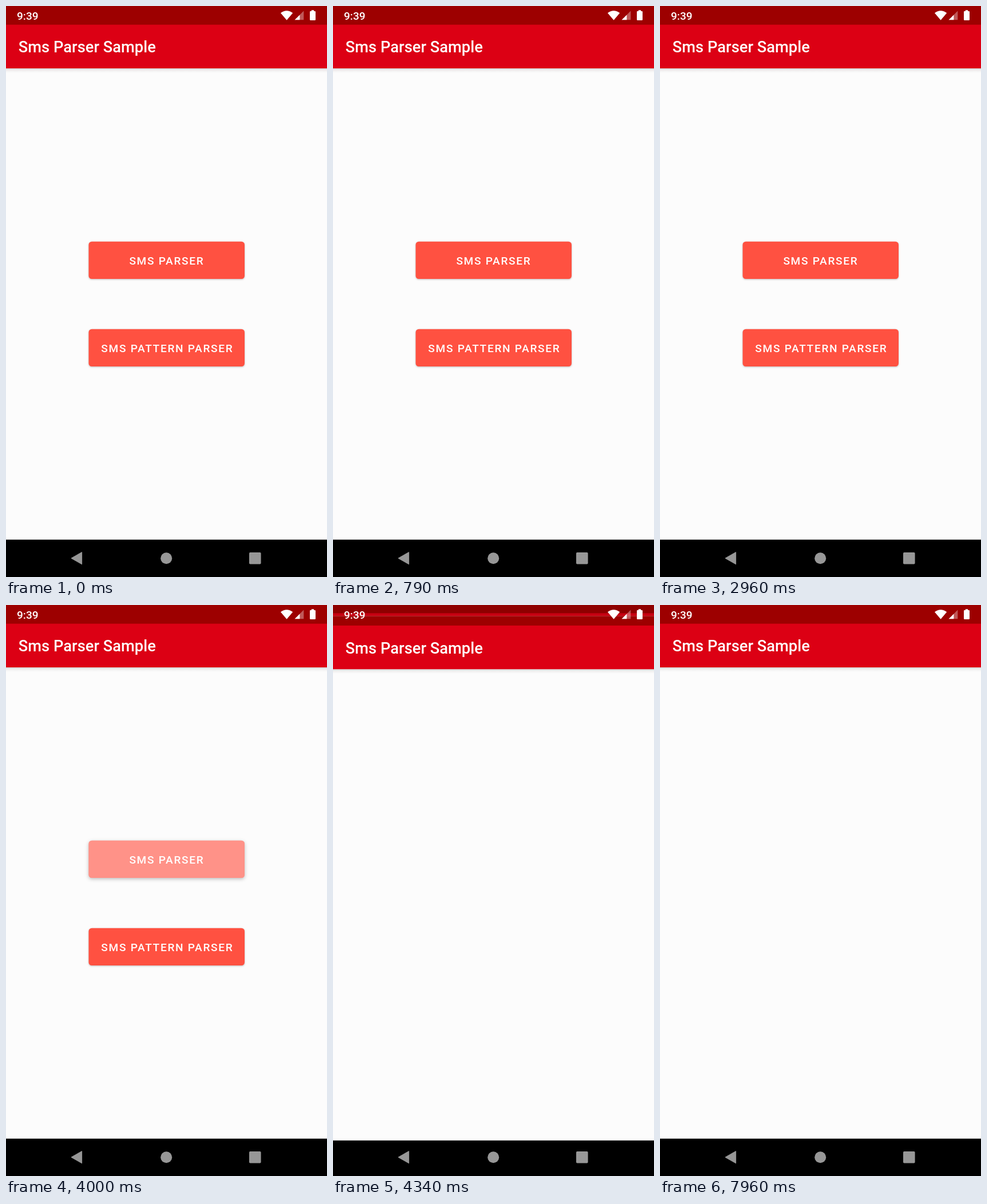
Write an HTML page that moves like this. It is 561x998 px and loops after 8 s.

```html
<!DOCTYPE html>
<html lang="en">
<head>
<meta charset="utf-8">
<style>
  html, body { margin: 0; width: 100%; height: 100%; overflow: hidden; background: #000; }
  svg { display: block; width: 561px; height: 998px; }
  text { font-family: Roboto, sans-serif; font-weight: 500; fill: #fff; }
  .title { font-size: 27.3px; }
  .label { font-size: 19.1px; letter-spacing: 1.7px; }
  .clock { font-size: 19.1px; }
  .face { fill: #ff5141; }
</style>
</head>
<body>
<svg viewBox="0 0 561 998">
  <defs>
    <linearGradient id="shade" x2="0" y2="1">
      <stop offset="0" stop-opacity=".16"/>
      <stop offset=".4" stop-opacity=".05"/>
      <stop offset="1" stop-opacity="0"/>
    </linearGradient>
    <clipPath id="buttonClip"><rect x="144.5" y="411.7" width="272.5" height="65.3" rx="5.5"/></clipPath>
    <clipPath id="revealClip"><rect id="reveal" width="561" height="998"/></clipPath>
    <g id="window">
      <rect width="561" height="998" fill="#fcfcfc"/>
      <rect y="109" width="561" height="8" fill="url(#shade)"/>
      <rect width="561" height="34" fill="#9d0000"/>
      <rect y="32.7" width="561" height="76.3" fill="#dc0014"/>
      <rect y="932.7" width="561" height="66" fill="#000"/>
      <text class="title" x="21.8" y="81.4">Sms Parser Sample</text>
    </g>
  </defs>

  <rect width="561" height="998"/>

  <g id="menu">
    <use href="#window"/>
    <rect id="button" class="face" x="144.5" y="411.7" width="272.5" height="65.3" rx="5.5"/>
    <g clip-path="url(#buttonClip)" fill="#fff">
      <rect id="tint" x="144" y="411" width="274" height="67"/>
      <circle id="ripple" cx="280.5" cy="444.5" fill-opacity=".215"/>
    </g>
    <text class="label" x="215.4" y="451.6">SMS PARSER</text>
    <rect class="face" x="144.5" y="564.7" width="272.5" height="65.3" rx="5.5"
      style="filter: drop-shadow(0 1.5px 1.5px rgba(0,0,0,.25))"/>
    <text class="label" x="166.3" y="604.6">SMS PATTERN PARSER</text>
  </g>

  <g id="parser">
    <g clip-path="url(#revealClip)"><use href="#window"/></g>
  </g>

  <g id="system" fill="#fff">
    <text class="clock" x="19" y="24">9:39</text>
    <path d="M480 12.2Q490.5 4.4 501.2 12.2L490.6 24.8Z"/>
    <path d="M520.3 8.6V24.3H504.6Z" fill-opacity=".35"/>
    <path d="M513.4 15.5V24.3H504.6Z"/>
    <path d="M533.8 7.2h4.4v1.8h1.6q1.2 0 1.2 1.2v13.5q0 1.2-1.2 1.2h-7.6q-1.2 0-1.2-1.2v-13.5q0-1.2 1.2-1.2h1.6z"/>
    <g fill="#979797">
      <path d="M114 965.2L132.6 954.6V975.8Z" stroke="#979797" stroke-linejoin="round"/>
      <circle cx="280.2" cy="965.2" r="10"/>
      <rect x="425" y="955" width="20.6" height="20.6" rx="1.8"/>
    </g>
  </g>
</svg>
<script>
  const LOOP = 8000;
  const PRESS = { start: 3340, grow: 260, tint: 80, lift: 100 };
  const OPEN = { start: 4057, span: 425 };
  const HEIGHT = 998;

  const $ = id => document.getElementById(id);
  const clamp = v => Math.min(1, Math.max(0, v));
  const bezier = (s, a, b, c, d) => {
    const r = 1 - s;
    return a * r * r * r + 3 * b * s * r * r + 3 * c * s * s * r + d * s * s * s;
  };

  // Finds y at x on a cubic given as four x values and four y values.
  function ease(x, xs, ys) {
    let lo = 0, hi = 1;
    for (let i = 0; i < 24; i++) {
      const mid = (lo + hi) / 2;
      if (bezier(mid, ...xs) < x) lo = mid; else hi = mid;
    }
    return bezier((lo + hi) / 2, ...ys);
  }

  const slowIn = p => ease(p, [0, 0.4, 0.2, 1], [0, 0, 1, 1]);
  const extraSlowIn = p => p < 1 / 6
    ? ease(p, [0, 0.05, 0.1333, 0.1667], [0, 0, 0.06, 0.4])
    : ease(p, [0.1667, 0.2083, 0.25, 1], [0.4, 0.82, 1, 1]);

  function drawPress(t) {
    const age = t - PRESS.start;
    const lift = clamp(age / PRESS.lift);
    $('tint').setAttribute('fill-opacity', 0.2 * clamp(age / PRESS.tint));
    $('ripple').setAttribute('r', 145 * slowIn(clamp(age / PRESS.grow)));
    $('button').style.filter =
      `drop-shadow(0 ${1.5 + lift}px ${1.5 + 1.5 * lift}px rgba(0,0,0,.25))`;
  }

  function drawOpen(t) {
    const p = clamp((t - OPEN.start) / OPEN.span);
    const move = p === 0 ? 0 : p === 1 ? 1 : slowIn(p);
    const top = p === 1 ? 0 : 0.959 * HEIGHT * (1 - extraSlowIn(p));
    $('menu').setAttribute('transform', `translate(0 ${-0.02 * HEIGHT * move})`);
    $('menu').setAttribute('opacity', 1 - 0.1 * move);
    $('parser').setAttribute('visibility', p > 0 ? 'visible' : 'hidden');
    $('parser').setAttribute('transform', `translate(0 ${0.041 * HEIGHT * (1 - move)})`);
    $('reveal').setAttribute('y', top);
  }

  const origin = performance.now();
  function frame() {
    const t = (performance.now() - origin) % LOOP;
    drawPress(t);
    drawOpen(t);
    requestAnimationFrame(frame);
  }
  frame();
</script>
</body>
</html>
```
